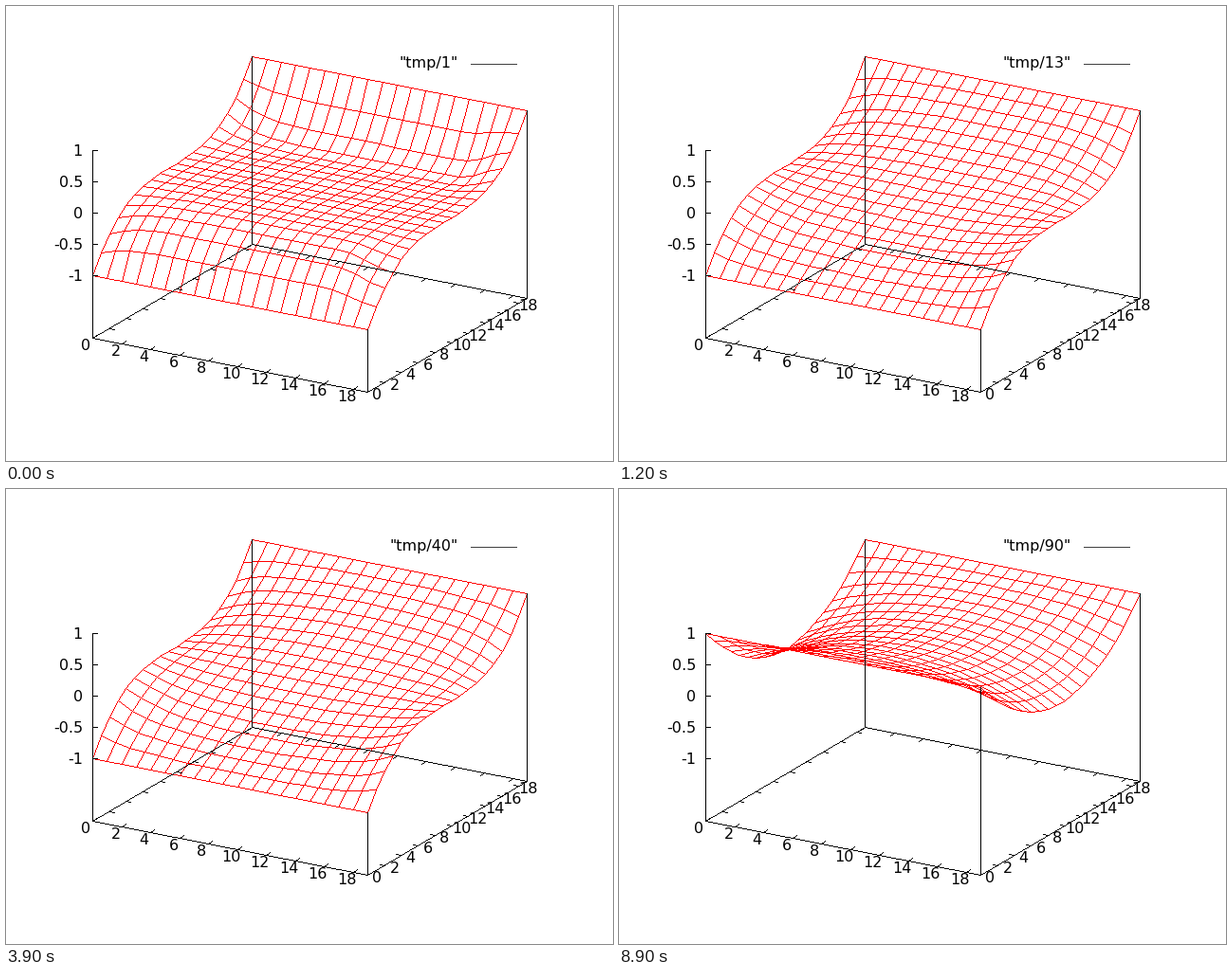
A matplotlib script that plays this animation: 640x480 px, repeating every 9 s.

```python
import numpy as np
import matplotlib.pyplot as plt
from matplotlib.animation import FuncAnimation

W, H, DPI = 640, 480, 100
N = 20                  # grid points per side
M = N - 1
SWEEPS = 3              # relaxation sweeps per frame
FRAMES = 90
FONT_PT = 16 * 72 / DPI
RED, BLACK, GREY = (255, 0, 0), (0, 0, 0), (64, 64, 64)

ORIGIN = np.array([91.0, 350.0])
X_AXIS = np.array([290.0, 57.2])
Y_AXIS = np.array([168.3, -99.2])
Z_UNIT = 66.0

plt.rcParams["font.family"] = "DejaVu Sans"


def to_pixel(p):
    return np.floor(np.asarray(p) + 0.5).astype(int)


def project(x, y, z=-2.0):
    """Map grid coordinates to whole pixels; the floor lies at z = -2."""
    x, y, z = np.broadcast_arrays(x, y, z)
    p = ORIGIN + x[..., None] / M * X_AXIS + y[..., None] / M * Y_AXIS
    p[..., 1] -= (z + 2) * Z_UNIT
    return to_pixel(p)


def plate(power):
    """Zero inside, with t**power along the edges, indexed [y][x]."""
    edge = np.linspace(-1, 1, N) ** power
    u = np.zeros((N, N))
    u[:, 0] = u[:, -1] = edge
    u[0], u[-1] = edge[0], edge[-1]
    return u.tolist()


def relax(u, sweeps):
    """Gauss-Seidel sweeps for Laplace's equation, front to back."""
    u = [row[:] for row in u]
    for _ in range(sweeps):
        for y in range(1, M):
            for x in range(1, M):
                u[y][x] = (u[y - 1][x] + u[y + 1][x] + u[y][x - 1] + u[y][x + 1]) / 4
    return u


surfaces = [relax(plate(3), SWEEPS)]
while len(surfaces) < FRAMES - 1:
    surfaces.append(relax(surfaces[-1], SWEEPS))
surfaces.append(relax(plate(2), SWEEPS * FRAMES))
surfaces = np.array(surfaces)


def stroke(img, points, color):
    """Draw a one-pixel polyline without smoothing."""
    for a, b in zip(points[:-1], points[1:]):
        n = max(abs(b - a).max(), 1)
        p = to_pixel(a + (b - a) * (np.arange(n + 1) / n)[:, None])
        img[p[:, 1], p[:, 0]] = color


fig = plt.figure(figsize=(W / DPI, H / DPI), dpi=DPI, facecolor="white")
ax = fig.add_axes([0, 0, 1, 1])
ax.set_xlim(0, W)
ax.set_ylim(H, 0)
ax.axis("off")


def label(x, y, text, ha="center"):
    return ax.text(x, y, text, ha=ha, va="baseline", fontsize=FONT_PT, color="black")


def tick(p, axis):
    return np.array([p, to_pixel(p + 5 * axis / np.hypot(*axis))])


box = [project(np.array([0, M, M, 0, 0]), np.array([0, 0, M, M, 0]))]
box += [project(x, y, np.array([-2.0, 1.0])) for x, y in ((0, 0), (0, M), (M, M))]

for v in range(0, N, 2):
    front, back = project(v, 0), project(v, M)
    left, right = project(0, v), project(M, v)
    box += [tick(front, Y_AXIS), tick(back, -Y_AXIS),
            tick(left, X_AXIS), tick(right, -X_AXIS)]
    label(front[0] - 6.5, front[1] + 13, str(v))
    label(right[0] + 10.5, right[1] + 8, str(v))

for z in (-1, -0.5, 0, 0.5, 1):
    p = project(0, 0, z)
    box.append(tick(p, np.array([1, 0])))
    label(81, p[1] + 6, f"{z:g}", "right")

title = label(477, 65, "", "right")
blank = np.full((H, W, 3), 255, np.uint8)
stroke(blank, np.array([[490, 61], [538, 61]]), GREY)
canvas = fig.figimage(blank, origin="upper", zorder=-1)

gx, gy = np.meshgrid(np.arange(N), np.arange(N))


def update(i):
    u = surfaces[i]
    img = blank.copy()
    mesh = project(gx, gy, u)
    for line in (*mesh, *mesh.swapaxes(0, 1)):
        stroke(img, line, RED)
    for line in (*box, project(M, 0, np.array([-2.0, u[0, -1]]))):
        stroke(img, line, BLACK)
    canvas.set_data(img)
    title.set_text(f'"tmp/{i + 1}"')
    return canvas, title


anim = FuncAnimation(fig, update, frames=FRAMES, interval=100, repeat=True,
                     repeat_delay=0, blit=False)
plt.show()
```
